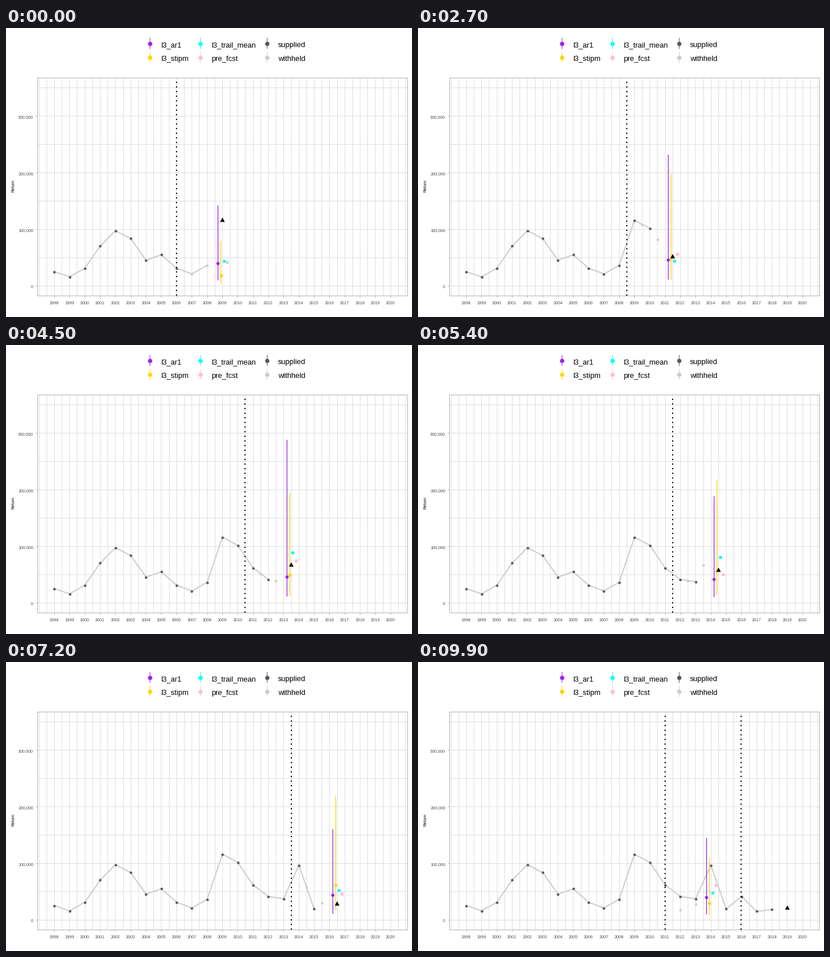
Animation of 700x500 px, one loop 10000 ms. Source, as a matplotlib script:

```python
import matplotlib.pyplot as plt
import numpy as np
from matplotlib.animation import FuncAnimation

W, H, DPI = 700, 500, 100
PX = 72 / DPI  # one pixel in points
FRAMES, STATES = 100, 11
FIRST_YEAR = 1998
TWEENS = [8] + [18 + 9 * j for j in range(10)]

PURPLE, GOLD, CYAN, PINK = "#A020F0", "#FFD700", "#00FFFF", "#FFC0CB"
SUPPLIED, WITHHELD = "#595959", "#CCCCCC"
GRID, BORDER = "#DEDEDE", "#B3B3B3"

# Yearly returns, in thousands
returns = np.array([25, 15.8, 31.1, 69.9, 97.4, 83.2, 45.4, 54.6, 31.1, 20.9, 36.2,
                    115.8, 101.5, 61.7, 41.3, 37.2, 96.4, 18.9, 41.3, 14.8, 17.9, 20.9])

# Three-year-ahead forecasts, one per state
state = np.arange(STATES)
last = returns[8:8 + STATES]
trail = np.convolve(returns, np.ones(3) / 3, "valid")[6:6 + STATES]
ar1 = 35 + 0.14 * last
ar1_lo = 0.24 * ar1
ar1_hi = 3.6 * ar1 + 180 * np.exp(-((state - 3.8) / 1.2) ** 2)
stipm = np.interp(state, [0, 1.5, 3.5, 4.5, 6.5, 8.5, 10], [18, 36, 60, 40, 75, 47, 42])
stipm_lo = (0.2 + 0.01 * state) * stipm
stipm_hi = (4.4 - 0.11 * state) * stipm
pre = np.interp(state, [0, 2, 4, 5, 7, 9, 10], [42, 42, 100, 50, 50, 33, 80])


def px_x(year):
    return 293.8 + 26.36 * (np.asarray(year) - 2006)


def px_y(value):
    return 446 - 0.98 * np.asarray(value)


def mid(v):
    """Centre of the pixel nearest to v."""
    return np.round(v) + 0.5


plt.rcParams["font.family"] = "Liberation Sans"
plt.rcParams["path.snap"] = False
fig = plt.figure(figsize=(W / DPI, H / DPI), dpi=DPI, facecolor="white")
ax = fig.add_axes([0, 0, 1, 1])
ax.set(xlim=(0, W), ylim=(H, 0))
ax.axis("off")


def label(x, y, text, size, color, **kw):
    ax.text(x, y, text, fontsize=size * PX, color=color, **kw)


def dots(size, color, z, x=(), y=()):
    return ax.scatter(x, y, s=(size * PX) ** 2, color=color, linewidths=0, zorder=z)


def place(dot, year, value):
    dot.set_offsets(np.column_stack([px_x(year) + 0.3, px_y(value)]))


def stroke(width, color, z, **kw):
    return ax.plot([], [], lw=width * PX, color=color, zorder=z, **kw)[0]


# Panel
L, R, T, B = 54.5, 692.5, 86.5, 463.5
years = np.arange(FIRST_YEAR, 2021)
ax.vlines(mid(px_x(np.arange(1997, 2021.1, 0.5))), T, B, color=GRID, lw=PX, zorder=1)
ax.hlines(mid(px_y(np.arange(0, 351, 50))), L, R, color=GRID, lw=PX, zorder=1)
ax.vlines(mid(px_x(years)), B, B + 3, color=BORDER, lw=PX, zorder=1)
ax.hlines(mid(px_y(np.arange(0, 301, 100))), L - 3, L, color=BORDER, lw=PX, zorder=1)
ax.plot([L, R, R, L, L], [T, T, B, B, T], color=BORDER, lw=PX, zorder=9)

for year in years:
    label(px_x(year) + 0.2, 478, str(year), 7.3, "#4D4D4D", ha="center")
for value in range(0, 301, 100):
    label(47.2, px_y(value) + 4.3, f"{value * 1000:,}", 7.3, "#4D4D4D", ha="right")
label(13, 273.5, "Return", 7.3, "black", rotation=90, ha="center", va="center")

# Legend
LEGEND = [("l3_ar1", PURPLE), ("l3_stipm", GOLD), ("l3_trail_mean", CYAN),
          ("pre_fcst", PINK), ("supplied", SUPPLIED), ("withheld", WITHHELD)]
for n, (name, color) in enumerate(LEGEND):
    x, y = (248.3, 335.3, 450.3)[n // 2], 27.2 + 24 * (n % 2)
    ax.vlines(x, y - 10, y + 9, color=color, lw=PX)
    dots(7.4, color, 3, x, y)
    label(x + 18.8, y + 5.5, name, 12.7, "black")

# Moving parts
history = stroke(2, WITHHELD, 3, solid_joinstyle="round")
known = dots(4.4, SUPPLIED, 4)
hidden = dots(4.4, WITHHELD, 5)
cutoffs = [stroke(2, "black", 4, linestyle=(0, (1, 3)), dash_capstyle="butt")
           for _ in range(2)]
bars = [(stroke(1.3, color, 6, solid_capstyle="butt"), lo, hi, shift)
        for color, lo, hi, shift in ((PURPLE, ar1_lo, ar1_hi, -0.3),
                                     (GOLD, stipm_lo, stipm_hi, -0.1))]
forecasts = [(dots(5.6, color, 7), values, shift) for color, values, shift in
             ((PURPLE, ar1, -0.3), (GOLD, stipm, -0.1), (CYAN, trail, 0.1), (PINK, pre, 0.3))]
actual = ax.fill([0, 0, 0], [0, 0, 0], color="black", lw=0, zorder=8)[0]


def draw(i):
    k = sum(t < i for t in TWEENS)
    moving = i in TWEENS
    wraps = moving and k == STATES - 1
    nxt = (k + 1) % STATES if moving else k

    def tween(values):
        return (values[k] + values[nxt]) / 2

    step = (k + nxt) / 2
    target = 2009 + step

    # The shown history waits for the move to finish
    n = 11 + k
    history.set_data(px_x(years[:n]) + 0.3, px_y(returns[:n]))
    seen = n if moving else n - 2
    place(known, years[:seen], returns[:seen])
    place(hidden, [target - 2, target - 1], [tween(returns[9:]), tween(returns[10:])])

    # The last cutoff and triangle stay put while the loop wraps round
    for line, year in zip(cutoffs, (2006 + step, 2006 + k)):
        line.set_data([np.round(px_x(year))] * 2, [463, 87])
    cutoffs[1].set_visible(wraps)

    for bar, lo, hi, shift in bars:
        bar.set_data([mid(px_x(target + shift))] * 2, px_y([tween(lo), tween(hi)]))
    for dot, values, shift in forecasts:
        place(dot, [target + shift], [tween(values)])

    year, value = (2009 + k, returns[n]) if wraps else (target, tween(returns[11:]))
    x, y = px_x(year) + 0.3, px_y(value)
    actual.set_xy([(x - 4, y + 3), (x + 4, y + 3), (x, y - 4.5)])
    return []


anim = FuncAnimation(fig, draw, frames=FRAMES, interval=100, repeat=True,
                     repeat_delay=0, blit=False)
plt.show()
```
